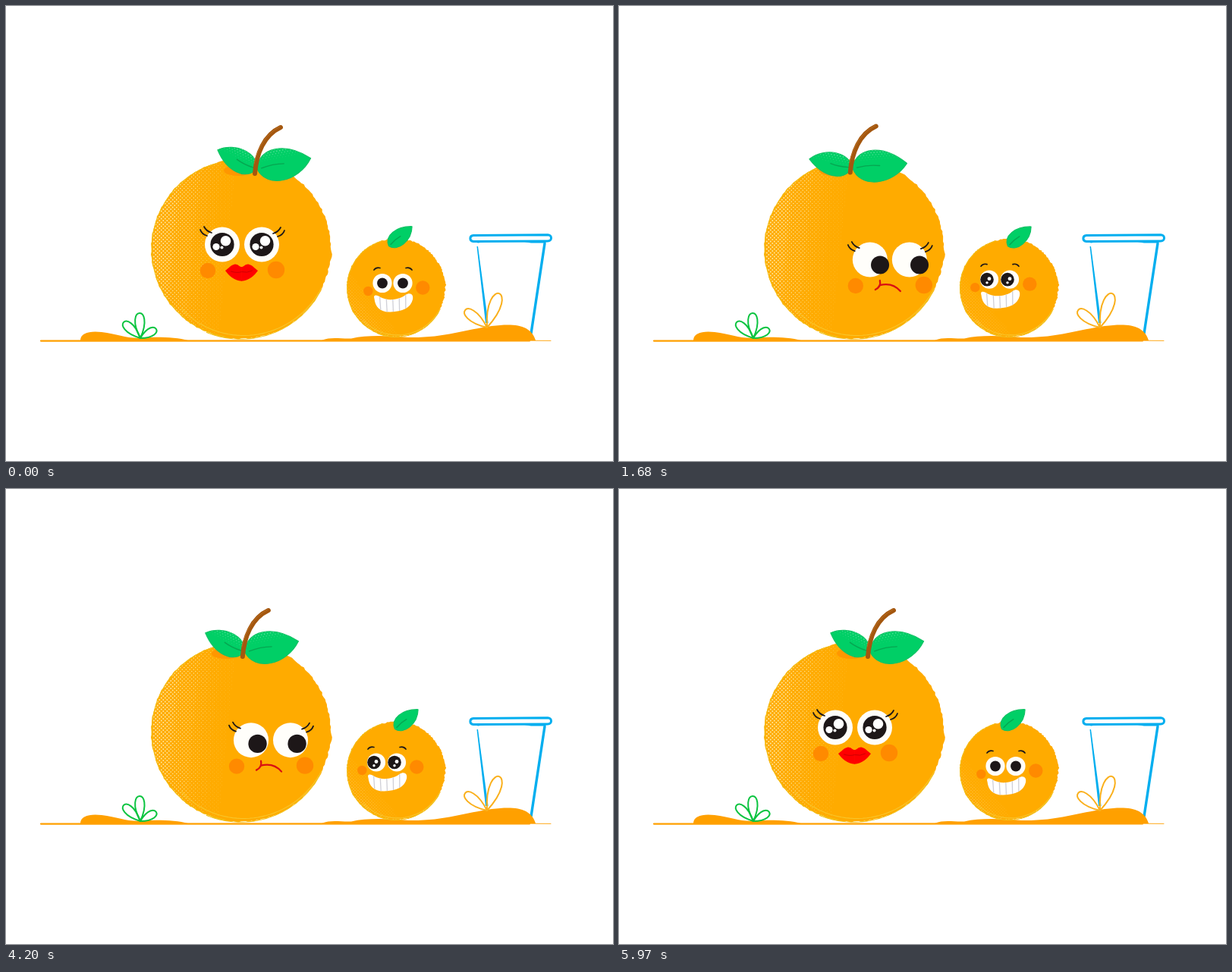
Animation, 800 px wide and 600 px high, one loop 6000 ms. Source, as an HTML page with a canvas:

```html
<!DOCTYPE html>
<html lang="en">
<head>
<meta charset="utf-8">
<title>Two oranges</title>
<style>
html, body { margin: 0; width: 100%; height: 100%; overflow: hidden; background: #fff; }
canvas { display: block; width: 800px; height: 600px; }
</style>
</head>
<body>
<canvas id="stage" width="800" height="600"></canvas>
<script>
const ctx = document.getElementById('stage').getContext('2d');
const LOOP = 6000, TAU = Math.PI * 2;
const ORANGE = '#ffab00', SOIL = '#ffa000', CHEEK = '#ff8a00', GREEN = '#00cf66', BLUE = '#00aeef', INK = '#1d1718';

const clamp = v => Math.max(0, Math.min(1, v));
const noise = n => { const s = Math.sin(n * 12.9898) * 43758.5453; return s - Math.floor(s); };

// Timing rules, all in milliseconds
const ramp = (t, from, to) => { const u = clamp((t - from) / (to - from)); return u * u * (3 - 2 * u); };
const hill = (t, mid, width) => Math.exp(-(((t - mid) / width) ** 2));
function spring(t, start) {
  const s = Math.max(0, t - start) / 1000;
  return 1 - Math.exp(-8 * s) * Math.cos(13 * s);
}
function bounce(t, start) {
  const s = Math.max(0, t - start) / 1000;
  return Math.exp(-9 * s) * Math.sin(22 * s);
}

function group(x, y, draw, angle = 0, sx = 1, sy = sx) {
  ctx.save();
  ctx.translate(x, y);
  ctx.rotate(angle);
  ctx.scale(sx, sy);
  draw();
  ctx.restore();
}
function fill(d, color) {
  ctx.fillStyle = color;
  ctx.fill(new Path2D(d));
}
function line(d, color, width) {
  ctx.strokeStyle = color;
  ctx.lineWidth = width;
  ctx.stroke(new Path2D(d));
}
function clipped(d, draw) {
  ctx.save();
  ctx.clip(new Path2D(d));
  draw();
  ctx.restore();
}
function dot(x, y, r, color) {
  ctx.fillStyle = color;
  ctx.beginPath();
  ctx.arc(x, y, Math.max(0, r), 0, TAU);
  ctx.fill();
}

// Outlined grass blade: one looping curve from its root
function petal(x, y, dx, dy, color) {
  const w = 10 + Math.hypot(dx, dy) * .35, a = Math.atan2(dy, dx);
  const nx = -Math.sin(a) * w, ny = Math.cos(a) * w;
  const tx = x + dx * 1.33, ty = y + dy * 1.33;
  line(`M${x} ${y}C${tx + nx} ${ty + ny} ${tx - nx} ${ty - ny} ${x} ${y}`, color, 2);
}

function leaf(x, y, length, width, angle, dotted) {
  const l = length, w = width;
  const d = `M0 0C${l * .1} ${-w} ${l * .6} ${-w} ${l} 0C${l * .7} ${w} ${l * .1} ${w} 0 0Z`;
  group(x, y, () => {
    fill(d, GREEN);
    line(d, '#10c264', 1.2);
    if (dotted) clipped(d, () => {
      for (let i = 0; i < l; i += 4) for (let j = 0; j < 5; j++)
        dot(i + (j & 1) * 2, dotted * (w * .75 - j * 3), 1 - j * .18, '#52df97');
    });
    line(`M${l * .08} 0Q${l * .3} ${-w * .1} ${l * .5} 0`, '#06a651', 1.4);
  }, angle);
}

// Brushed fruit skin with halftone shading
function skin({ x, y, r, sx = 1, sy = 1, air = 0, gap, spur, shade }) {
  const at = (u, v) => {
    const k = r * (1 + .2 * air * u * u * v * v);
    return [x + u * k * sx * (1 - .05 * air * v), y + v * k * sy];
  };
  const polar = (a, k) => at(Math.cos(a) * k, Math.sin(a) * k);
  const arc = (from, to, k0, k1, color) => {
    ctx.beginPath();
    for (let i = 0; i <= 1; i += .025) ctx.lineTo(...polar(from + (to - from) * i, k0 + (k1 - k0) * i));
    ctx.strokeStyle = color;
    ctx.lineWidth = 1.1;
    ctx.stroke();
  };
  ctx.beginPath();
  for (let i = 0; i < 220; i++) {
    const a = i / 220 * TAU - Math.PI;
    ctx.lineTo(...polar(a, 1 + .014 * hill(a, spur, .04) + (noise(i + r) - .5) * 1.6 / r));
  }
  ctx.closePath();
  ctx.fillStyle = ORANGE;
  ctx.fill();

  ctx.beginPath();
  const n = Math.ceil(r / gap * 2);
  for (let j = -n; j <= n; j++) for (let i = -n; i <= n; i++) {
    const u = (i + (j & 1) / 2) * gap / r, v = j * gap / 2 / r;
    const size = clamp(shade(u, v)) * gap * .22;
    if (u * u + v * v > .985 || size < .2) continue;
    const [px, py] = at(u, v);
    ctx.moveTo(px + size, py);
    ctx.arc(px, py, size, 0, TAU);
  }
  ctx.fillStyle = '#ffe6a0';
  ctx.fill();

  arc(1.75, 4.5, .995, .995, '#f3bd12');
  arc(.45, 2.4, .995, .94, '#f8c52a');
  arc(.5, 2, 1 + .04 * air, 1.005, '#f2c01c');
}

function cup() {
  line('M710 313L692 432', BLUE, 3.4);
  fill('M620.5 317L622 317L635.5 418L632 418Z', BLUE);
  line('M616 302.6L714 301.8C720 302 720 310 714 310L616 310.4C610.5 310 610.5 303 616 302.6Z', BLUE, 3);
  fill('M616 310H637L622 312.5Z M677 310H714L710 312.5H692Z', BLUE);
}

function ground() {
  line('M46 441.6L690 441.4', SOIL, 2.2);
  line('M690 441.2L718 441.4', SOIL, .9);
  fill('M98 441C98 431 111 428 126 430C148 433 160 439 180 437.5C200 436 225 437 240 441Z', SOIL);
  fill('M416 441C428 436 440 439 455 438.5C475 434 500 434.5 530 437C575 438 605 427 640 422C672 418 692 421 698 441Z', SOIL);
}

function plants() {
  for (const [dx, dy] of [[-22, -21], [-1, -33], [21, -12]]) petal(177, 438, dx, dy, '#0bc440');
  for (const [dx, dy] of [[-29, -23], [16, -45]]) petal(634, 424, dx, dy, '#fab01c');
}

function crown(shift, flap) {
  group(306 + shift, 217, () => dot(0, 0, 19, '#ff9700'), 0, 1, .37);
  group(328 + shift, 222 - flap * 1.5, () => {
    leaf(2, -7, 57, 20, Math.PI + .46 - .26 * flap, 1);
    leaf(3, -7, 72, 28, -.2 + .12 * flap, -1);
    line('M0 -1C2 -27 12 -52 34 -62', '#a4570f', 6);
    line('M-1 -14C4 -36 15 -54 33 -63', '#b96f22', 1);
  });
}

function bigEye(x, y, look, over, shine) {
  dot(x, y, 23, '#fffefa');
  const px = x + 9 * look + 20 * over, py = y + 5 * look + 8 * over;
  dot(px, py, 15.6 - 3.6 * clamp(look), INK);
  dot(px + 4.5 * shine, py - 4.8, 6.8 * shine, '#fff');
  dot(px - 8 * shine, py + 3 * shine, 4.6 * shine, '#fff');
  dot(px - .5, py + 4 * shine, 2 * shine, '#fff');
}

function lashes(x, y, side, angle) {
  group(x, y, () => line('M0 0Q-7 -2 -9 -8M6 -4Q-1 -6 -4 -12', INK, 1.8), angle, side, 1);
}

function lips() {
  for (const side of [-1, 1]) group(0, 0, () =>
    fill('M-.3 -7C3 -7 5 -11 9 -10.5C15 -9 17 -5 21.5 -2C17 4 10 11.5 -.3 11.7Z', '#fe0000'), 0, side, 1);
  line('M-14 -1Q-6 1.5 0 -.5Q7 1.5 14 -2', '#c80000', .9);
}

function big(t) {
  const look = spring(t, 1440) - spring(t, 4300) - .05 * ramp(t, 2610, 4200) * (1 - ramp(t, 4300, 4500));
  const over = Math.max(0, look - 1);
  const shine = 1 - ramp(t, 1360, 1440) + ramp(t, 4450, 4900);
  const flutter = hill(t, 930, 90);

  skin({ x: 309.8, y: 320.5, r: 118.3, gap: 5, spur: .07, shade: (u, v) => .03 - u - .1 * v });
  crown(-17 * look - 26 * over, over / .15);

  group(40 * look, 17.5 * look, () => {
    dot(266, 349, 10.2, CHEEK);
    dot(356, 348, 11.2, CHEEK);
    bigEye(285, 314.5, look, over, shine);
    bigEye(337, 314.5, look, over, shine);
    lashes(265, 303, 1, -.8 * flutter);
    lashes(358, 304, -1, -.35 * flutter);
    if (look > .5) line(`M298 342Q300 350 292 354M298 348Q315 344 325 356`, '#d90f12', 2.3);
    else group(310.5, 351, lips, 0, 1 + .13 * hill(t, 4580, 150));
  });
}

function smallEye(x, y, turn, air) {
  group(x, y, () => {
    dot(0, 0, 12.6 - .5 * turn, '#fffefa');
    const px = -3 * turn;
    dot(px, 0, 6.9 + 1.9 * turn, INK);
    dot(px + 3 * turn, -1, 2.4 * turn, '#fff');
    dot(px, 4.2, 1.7 * turn, '#fff');
  }, 0, 1 - .28 * air, 1 + .1 * air);
}

function grinMouth() {
  const d = 'M-25 -5C-27 -11 -21 -10 -17 -7C-8 -2 7 -3 16 -10C22 -14 27 -11 25.5 -4C23 7 12 12 -4 12.5C-17 13 -24 6 -25 -5Z';
  fill(d, '#fff');
  clipped(d, () => {
    for (let i = -2; i <= 2; i++) line(`M${i * 8.6 - 1} -12L${i * 8.2} 14`, '#cfcfd6', 1.3);
  });
}

function small(t) {
  const u = clamp((t - 780) / 480);
  const air = 4 * u * (1 - u), lift = 111 * air;
  const drag = (1 - 2 * u) * air;
  const sy = 1 + .045 * air - .18 * hill(t, 690, 80) - .38 * bounce(t, 1260);
  const sx = 1 / sy - .08 * air;
  const turn = ramp(t, 1400, 1600) - ramp(t, 5000, 5200);
  const grin = 1 - ramp(t, 300, 480) + ramp(t, 1300, 1440);
  const bottom = 436.5 - lift + 50 * Math.max(0, 1 - sy);
  const y = bottom - 65 * sy;

  skin({
    x: 514, y, r: 64.7, sx, sy, air, gap: 4, spur: -.07,
    shade: (a, b) => -.75 * a + .6 * b - .3
  });
  leaf(504.5 + 8 * turn + 4 * air, y - 64 * sy + 9 - 10 * air, 40, 14, -.7 + 4.1 * drag);

  group(-8 * turn, y - 371.5 - 5 * turn + 46 * drag, () => {
    dot(477.3, 376, 6.2, CHEEK);
    dot(549.3, 371.5, 9.2, CHEEK);
    smallEye(496, 365.5, turn, air);
    smallEye(523, 365.5, turn, air);
    line('M485 348Q488 344 493 345.5M527 345.5Q532 344 535 348', INK, 1.7);
    if (grin < .35) line('M497 389Q508 397 520 388', INK, 1.8);
    else group(510.5, 391, grinMouth, 0, grin);
  });
}

function frame() {
  const t = performance.now() % LOOP;
  ctx.fillStyle = '#fff';
  ctx.fillRect(0, 0, 800, 600);
  ctx.lineCap = 'round';
  ctx.lineJoin = 'round';
  cup();
  ground();
  big(t);
  small(t);
  plants();
  requestAnimationFrame(frame);
}
frame();
</script>
</body>
</html>
```
